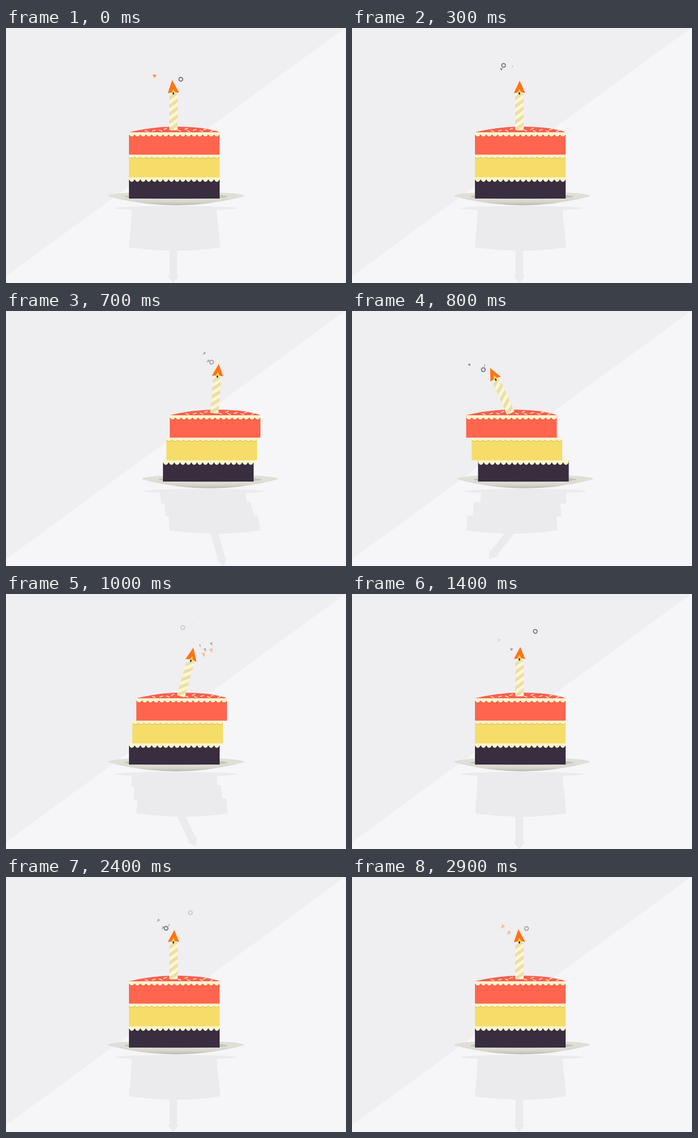
Animation, 600 px wide and 450 px high, one loop 3 s. Source, as an HTML page:

```html
<!DOCTYPE html>
<html lang="en">
<head>
<meta charset="utf-8">
<title>Birthday cake</title>
<style>
  html, body { margin: 0; width: 100%; height: 100%; overflow: hidden; background: #f6f5f8; }
  svg { display: block; width: 100vw; height: 100vh; }
</style>
</head>
<body>
<svg viewBox="0 0 600 450">
  <defs>
    <clipPath id="wax"><path d="M288 116H303V178Q303 180.500 300 180.500H291Q288 180.500 288 178Z"/></clipPath>
    <linearGradient id="bowl" x1="0" y1="0" x2="0" y2="1">
      <stop offset=".5" stop-color="#d9d9d0"/>
      <stop offset="1" stop-color="#b9b9ae"/>
    </linearGradient>
  </defs>
  <rect width="600" height="450" fill="#f6f5f8"/>
  <path d="M0 0H598L0 438Z" fill="#efeef1"/>
  <g id="scene">
    <g id="mirror" fill="#ebeaed">
      <ellipse class="base" cx="300" cy="318" rx="108" ry="4"/>
      <path class="base" d="M222 319H372L373 340H221Z"/>
      <path class="mid" d="M221 337H373L376 363H219Z"/>
      <path class="top" d="M219 361H376L378 387Q340 393 297 393Q250 392 217 387Z"/>
      <g id="candleMirror">
        <path d="M288.500 390H302V437H288.500Z"/>
        <path d="M285 437H305L295 451Z"/>
      </g>
    </g>
    <g class="base">
      <path d="M188 299Q245 313 300 313Q355 313 412 299Z" fill="url(#bowl)"/>
      <ellipse cx="300" cy="296" rx="120" ry="7.500" fill="#dedfd7"/>
      <ellipse cx="300" cy="297.500" rx="91" ry="4.500" fill="#c3c3bb"/>
    </g>
    <g class="base" id="dark"></g>
    <g class="mid" id="yellow"></g>
    <g class="top" id="red"></g>
    <g id="candle">
      <g clip-path="url(#wax)">
        <rect x="288" y="115" width="15" height="67" fill="#fdf6d0"/>
        <path id="stripes" fill="#e9dfae"/>
      </g>
      <path id="flame" fill="#ff7415"/>
      <path d="M295.500 107L299.500 116H291.500Z" fill="#ffdc72"/>
      <ellipse cx="295.400" cy="115.500" rx="1.300" ry="2.200" fill="#33253a"/>
      <g id="sparks"></g>
    </g>
  </g>
</svg>
<script>
const $ = id => document.getElementById(id);
const STEP = 100, FRAMES = 30, ENTER = 6;

// Cake layer: body, domed top and scalloped icing
function layer(id, y, bottom, body, roof, drop) {
  const dome = `M217 ${y + 1}V${y}Q258 ${y - 10} 297 ${y - 10}Q352 ${y - 10} 377 ${y}V${y + 1}Z`;
  const n = 16, w = 160 / n;
  const scallops = `M217 ${y}V${y + 4}` + `q${w / 2} ${drop} ${w} 0`.repeat(n) + `V${y}Z`;
  $(id).innerHTML =
    `<path d="M217 ${y}H377V${bottom}H217Z" fill="${body}"/>
     <path d="${dome}" fill="${roof}"/>
     <path d="${scallops}" fill="#000" opacity=".13" transform="translate(0 1.2)"/>
     <path d="${scallops}" fill="#fdf5cc"/>`;
}
const cream = '#fdf5cc';
layer('dark', 263, 301, '#392d40', cream, 9);
layer('yellow', 223, 263.5, '#f6dd69', cream, 5);
layer('red', 184, 223.5, '#ff654f', '#f95f4d', 7);

const sprinkles = [[248, 182, 1], [261, 181, -1], [273, 181, 1], [281, 178, -1], [306, 181, 1],
  [318, 178, -1], [322, 182, 1], [333, 180, -1], [345, 182, 1], [351, 179, -1], [363, 182, -1]];
$('red').insertAdjacentHTML('beforeend',
  `<path d="${sprinkles.map(([x, y, s]) => `M${x - 3} ${y - s}L${x + 3} ${y + s}`).join('')}"
    stroke="#ffdccb" stroke-width="1.8"/>`);

let d = '';
for (let y = 110; y < 190; y += 14) d += `M288 ${y + 11}L303 ${y}v7L288 ${y + 18}Z`;
$('stripes').setAttribute('d', d);

// Offsets per step after the entry; they rest at zero
const base = [281, 60, 5.5];
const mid = [301, 66, -6, -1, 6, 8, 2, -2.5];
const top_ = [324, 72, -15.5, -2, 13, 16, 4, -5];
const lean = [35, 5, -24, -6, 16, 20, 6, -8, 0, 3, 2, -2, -1, .5];
const smear = [22, 8];
const at = (list, f) => f < ENTER ? 0 : list[f - ENTER] || 0;

// Each kind: per age an opacity and its points beside the candle foot
const kinds = {
  ring: [[.6, [12.5, -89]], [1, [13, -89.5]], [.95, [28, -114]], [.3, [30, -117]]],
  grey: [[.8, [14, -82]], [.55, [19, -90], [27, -103]], [.9, [32, -107]]],
  orange: [[.45, [19, -81], [30, -92]], [1, [33.5, -95]], [.25, [36, -98]]],
  dash: [[.8, [8, -95]], [.35, [12, -112]], [.12, [15, -128]]]
};
// kind, side, starting steps
const bursts = [
  ['ring', -1, [1, 7, 15, 23]], ['ring', 1, [12, 21, 29]],
  ['grey', -1, [1, 6, 14, 23]], ['grey', 1, [9, 17, 25]],
  ['orange', -1, [12, 20, 29]], ['orange', 1, [10, 18, 26]],
  ['dash', -1, [2, 8, 16, 24]], ['dash', 1, [10, 19, 27]]
];

function mark(kind, side, x, y, blurred) {
  const pos = `transform="translate(${295.5 + side * x} ${180 + y})`;
  if (kind === 'ring') return `<circle ${pos}" r="3.3" fill="none" stroke="#747279" stroke-width="1.8"/>`;
  if (kind === 'dash') return `<path ${pos}" d="M${-side} -2L${side} 2" stroke="#85838a" stroke-width="1.3"/>`;
  const grey = kind === 'grey', s = grey ? .75 : 1;
  const turn = blurred ? ` rotate(${-side * 40}) scale(.9 1.5)` : '';
  return `<path ${pos}${turn} scale(${s})" d="M-3.5 -2.500H3.500L0 3Z" fill="${grey ? '#77757c' : '#ff8736'}"/>`;
}

function sparks(f) {
  let out = '';
  for (const [kind, side, starts] of bursts) {
    for (const s of starts) {
      const pose = kinds[kind][(f - s + FRAMES) % FRAMES];
      if (!pose) continue;
      const [opacity, ...pts] = pose;
      out += `<g opacity="${opacity}">` +
        pts.map(([x, y]) => mark(kind, side, x, y, pts.length > 1)).join('') + '</g>';
    }
  }
  return out;
}

function shift(name, x) {
  document.querySelectorAll('.' + name).forEach(e => e.setAttribute('transform', `translate(${x} 0)`));
}

function draw(f) {
  $('scene').style.display = f === 4 || f === 5 ? 'none' : '';
  const x = at(top_, f), a = at(lean, f), k = at(smear, f);
  shift('base', at(base, f));
  shift('mid', at(mid, f));
  shift('top', x);
  $('candle').setAttribute('transform', `translate(${x} 0) rotate(${a} 295.5 180)`);
  $('candleMirror').setAttribute('transform', `translate(${x} 0) rotate(${-1.6 * a} 295.5 390)`);
  $('mirror').setAttribute('transform', `translate(0 390) skewX(${k}) translate(0 -390)`);
  const sway = -Math.cos(f * Math.PI / 5);
  $('flame').setAttribute('d', `M${295.3 + 2 * sway} ${92.8 + sway}L305.500 114.500L295.500 113L285.500 115Z`);
  $('sparks').innerHTML = sparks(f);
}

let last = -1;
function tick() {
  const f = Math.floor(performance.now() / STEP) % FRAMES;
  if (f !== last) draw(last = f);
  requestAnimationFrame(tick);
}
tick();
</script>
</body>
</html>
```
